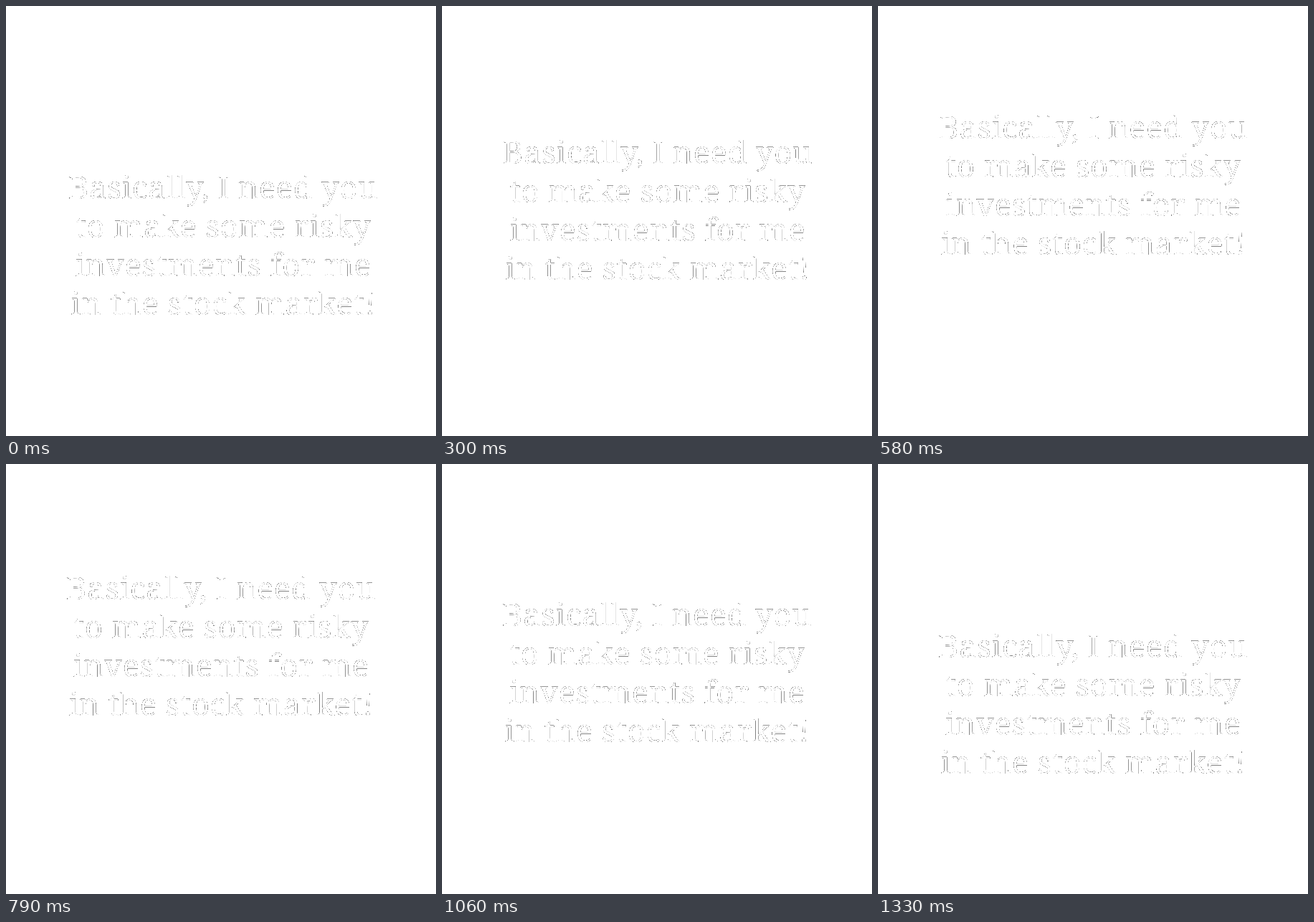
Write an HTML page with a canvas that moves like this. It is 600 by 600 pixels and loops after 1.36 s.

```html
<!DOCTYPE html>
<html lang="en">
<head>
<meta charset="utf-8">
<style>
  html, body { margin: 0; height: 100%; overflow: hidden; background: #fff; }
  canvas { display: block; }
</style>
</head>
<body>
<canvas width="600" height="600"></canvas>
<script>
const LOOP = 1360;
const LINES = [
  'Basically, I need you',
  'to make some risky',
  'investments for me',
  'in the stock market!'
];
const ctx = document.querySelector('canvas').getContext('2d', { willReadFrequently: true });
ctx.font = '44px "Noto Serif", serif';
ctx.letterSpacing = '0.4px';
ctx.textRendering = 'geometricPrecision';
ctx.textAlign = 'center';

// Steps last 30 ms, except step 17, which lasts 40 ms.
const stepAt = t => t < 550 ? Math.min(17, Math.floor(t / 30)) : Math.floor((t - 10) / 30);
const stepStart = step => step * 30 + (step > 17 ? 10 : 0);

function draw(t) {
  const x = 300 + 3 * Math.exp(-t / 250);
  const y = 182 + Math.hypot(33, 0.1745 * (t - 660)) - 33;
  ctx.fillStyle = '#000';
  ctx.fillRect(0, 0, 600, 600);
  ctx.fillStyle = '#fff';
  LINES.forEach((line, i) => ctx.fillText(line, x, y + i * 54));

  // Hard cut-out: mostly covered edge pixels keep their dark fringe, the rest turns white.
  const image = ctx.getImageData(0, 0, 600, 600);
  const data = image.data;
  for (let i = 0; i < data.length; i += 4) {
    const value = data[i] < 120 ? 255 : data[i];
    data[i] = data[i + 1] = data[i + 2] = value;
  }
  ctx.putImageData(image, 0, 0);
}

let shown = -1;
function tick() {
  const step = stepAt(performance.now() % LOOP);
  if (step !== shown) draw(stepStart(shown = step));
  requestAnimationFrame(tick);
}
tick();
</script>
</body>
</html>
```
